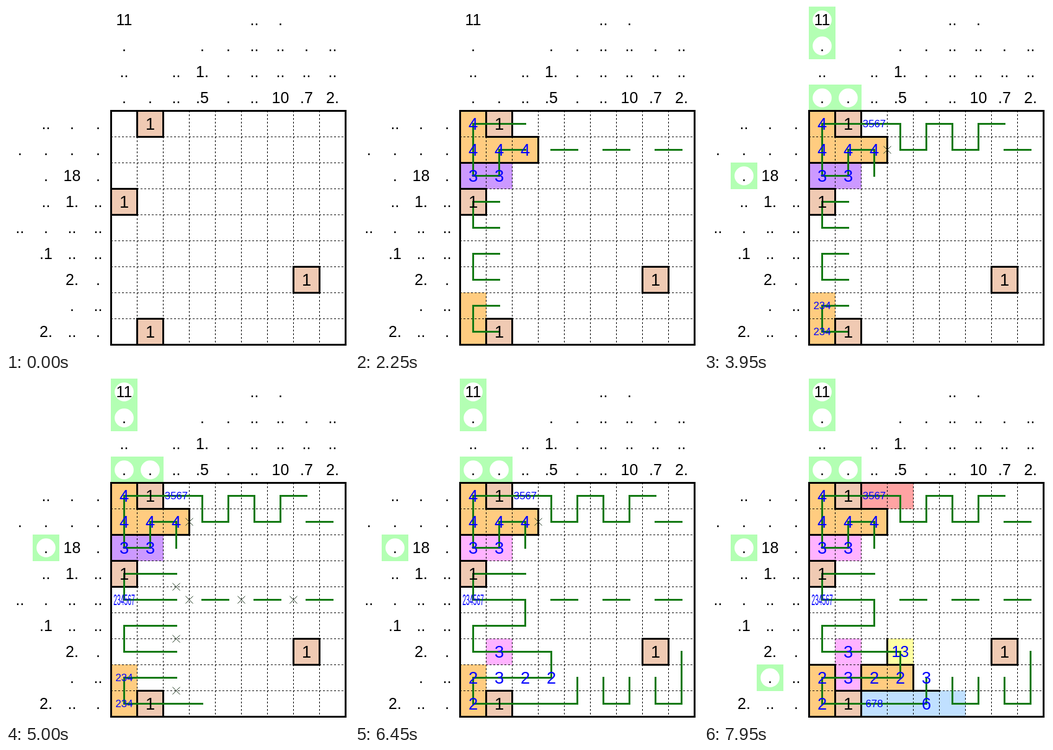
These frames come from a looping animation (553 by 556 pixels, 8 s). An HTML page with a canvas:

```html
<!DOCTYPE html>
<html lang="en">
<head>
<meta charset="utf-8">
<title>Loop puzzle being solved</title>
<style>
  html, body { margin: 0; width: 100%; height: 100%; overflow: hidden; background: #fff; }
  canvas { display: block; }
</style>
</head>
<body>
<canvas id="stage" width="553" height="556"></canvas>
<script>
const ctx = document.getElementById('stage').getContext('2d');
const CELL = 42, ORIGIN = 169.5, SIZE = 9, STEP = 50, LOOP = 8000;
const ORANGE = '#ffcc80', PURPLE = '#cc99ff', PINK = '#ffb3ff', GREEN = '#b3ffb3';
const RED = '#ffa3a3', YELLOW = '#ffffa3', BLUE = '#c0e0ff', GIVEN = '#f0cab3';

const topClues = [
  '11 _ _ _ _ .. . _ _',
  '. _ _ . . .. .. . ..',
  '.. _ .. 1. . .. .. .. ..',
  '. . .. .5 . .. 10 .7 2.'
].map(row => row.split(' '));
const leftClues = [
  '_ .. . .', '. . . .', '_ . 18 .', '_ .. 1. ..', '.. . .. ..',
  '_ .1 .. ..', '_ _ 2. .', '_ _ . ..', '_ 2. .. .'
].map(row => row.split(' '));
const givens = [[0, 1], [3, 0], [6, 7], [8, 1]];

const edge = i => ORIGIN + CELL * i;
const mid = i => edge(i + 0.5);

// Moves: each one puts a mark on a layer, or clears it when value is null.
const move = (layer, value, ...pos) => ({ layer, value, pos });
const fill = (r, c, color) => move('fill', color, r, c);
const ring = (r, c) => move('ring', true, r, c);
const text = (r, c, value) => move('text', value, r, c);
const right = (r, c) => move('line', true, r, c, r, c + 1);
const down = (r, c) => move('line', true, r, c, r + 1, c);
const wallAbove = (r, c) => move('border', true, r, c, r, c + 1);
const wallLeft = (r, c) => move('border', true, r, c, r + 1, c);
const cross = (r, c) => move('cross', true, r, c);
const uncross = (r, c) => move('cross', null, r, c);
const done = (r, c) => [fill(r, c, GREEN), ring(r, c)];

const schedule = [];
const from = (step, ...moves) =>
  moves.flat().forEach((m, i) => schedule.push({ ...m, step: step + i }));

from(1, right(0, 0), down(0, 0), right(8, 0), down(7, 0),
  fill(0, 0, ORANGE), fill(1, 0, ORANGE), fill(8, 0, ORANGE), fill(7, 0, ORANGE),
  wallAbove(2, 0), fill(2, 0, PURPLE), fill(2, 1, PURPLE),
  right(7, 0), right(6, 0), down(5, 0), right(5, 0), right(4, 0), down(3, 0),
  right(3, 0), right(2, 0), down(1, 0));
from(21, text(0, 0, '4'), text(1, 0, '4'), text(2, 0, '3'), text(2, 1, '3'),
  down(1, 1), right(1, 1), fill(1, 1, ORANGE), text(1, 1, '4'),
  fill(1, 2, ORANGE), text(1, 2, '4'),
  wallAbove(1, 2), wallLeft(1, 3), wallAbove(2, 1), wallAbove(2, 2), right(0, 1));
from(38, right(1, 3), right(1, 5), right(1, 7));
from(46, cross(1, 2.5), down(1, 2), done(2, -3));
from(52, right(0, 2), down(0, 3));
from(56, down(0, 4), right(0, 4), down(0, 5));
from(61, down(0, 6), right(0, 6));
from(65, text(0, 2, '34567'));
from(69, done(-4, 0), done(-3, 0), done(-1, 0), done(-1, 1),
  text(0, 2, '3567'), text(7, 0, '234'), text(8, 0, '234'), text(4, 0, '234567'));
from(85, right(8, 1), right(8, 2), right(7, 1), right(6, 1), right(5, 1), right(4, 1), right(3, 1),
  cross(3.5, 2), cross(5.5, 2), cross(7.5, 2), right(4, 3), right(4, 5), right(4, 7),
  cross(4, 2.5), cross(4, 4.5), cross(4, 6.5));
from(102, right(8, 3), down(7, 4), down(7, 5), right(8, 5), down(7, 6),
  down(7, 7), right(8, 7), down(7, 8), right(7, 2), right(6, 2), down(6, 3), down(4, 2),
  uncross(3.5, 2), uncross(5.5, 2), uncross(7.5, 2),
  uncross(4, 2.5), uncross(4, 4.5), uncross(4, 6.5), down(6, 8));
from(121, text(7, 0, '2'), text(8, 0, '2'), text(7, 2, '2'), text(7, 3, '2'),
  fill(2, 0, PINK), fill(2, 1, PINK), fill(6, 1, PINK), text(6, 1, '3'), text(7, 1, '3'));
from(130, fill(7, 1, PINK), wallAbove(7, 0), wallLeft(7, 1),
  fill(7, 2, ORANGE), fill(7, 3, ORANGE), wallLeft(7, 2), wallAbove(7, 2),
  wallAbove(7, 3), wallLeft(7, 4), wallAbove(8, 2), wallAbove(8, 3),
  fill(6, 3, YELLOW), text(6, 3, '13'), wallLeft(6, 3), done(7, -2), uncross(1, 2.5),
  fill(0, 2, RED), fill(0, 3, RED));
from(150, fill(8, 2, BLUE), text(8, 2, '678'));
from(154, fill(8, 3, BLUE), fill(8, 4, BLUE), fill(8, 5, BLUE), wallAbove(8, 4),
  text(8, 4, '6'), text(7, 4, '3'));

function stateAt(step) {
  const marks = { fill: new Map(), ring: new Map(), text: new Map(),
                  line: new Map(), border: new Map(), cross: new Map() };
  for (const m of schedule) {
    if (m.step > step) continue;
    if (m.value === null) marks[m.layer].delete(m.pos.join());
    else marks[m.layer].set(m.pos.join(), m);
  }
  return marks;
}

function segment(x1, y1, x2, y2) {
  ctx.beginPath();
  ctx.moveTo(x1, y1);
  ctx.lineTo(x2, y2);
  ctx.stroke();
}

function pen(color, width, cap = 'square', dash = []) {
  ctx.strokeStyle = color;
  ctx.lineWidth = width;
  ctx.lineCap = cap;
  ctx.setLineDash(dash);
}

function paintCell(r, c, color) {
  ctx.fillStyle = color;
  ctx.fillRect(edge(c) - 0.5, edge(r) - 0.5, CELL + 1, CELL + 1);
}

function write(r, c, string, size, color, condense = 1) {
  ctx.save();
  ctx.font = `${size}px "Liberation Sans", Arial, sans-serif`;
  ctx.textAlign = 'center';
  ctx.fillStyle = color;
  ctx.translate(mid(c), mid(r) + size * 0.35);
  ctx.scale(condense, 1);
  ctx.fillText(string, 0, 0);
  ctx.restore();
}

function writeEntry(r, c, string) {
  const n = string.length;
  if (n > 4) write(r, c, string, 24, '#00f', 2.6 / n);
  else write(r, c, string, n > 2 ? 16.8 : n > 1 ? 25 : 27.3, '#00f');
}

function draw(step) {
  const marks = stateAt(step);
  const end = edge(SIZE);
  ctx.fillStyle = '#fff';
  ctx.fillRect(0, 0, 553, 556);

  for (const { pos: [r, c], value } of marks.fill.values()) paintCell(r, c, value);
  for (const [r, c] of givens) paintCell(r, c, GIVEN);
  ctx.fillStyle = '#fff';
  for (const { pos: [r, c] } of marks.ring.values()) {
    ctx.beginPath();
    ctx.arc(mid(c), mid(r), 15.3, 0, 2 * Math.PI);
    ctx.fill();
  }

  pen('#000', 1, 'butt', [3, 3]);
  for (let i = 1; i < SIZE; i++) {
    segment(edge(i), ORIGIN - 0.5, edge(i), end);
    segment(ORIGIN - 0.5, edge(i), end, edge(i));
  }

  pen('#000', 3);
  for (const [r, c] of givens) ctx.strokeRect(edge(c), edge(r), CELL, CELL);
  for (const { pos: [r1, c1, r2, c2] } of marks.border.values())
    segment(edge(c1), edge(r1), edge(c2), edge(r2));
  ctx.strokeRect(ORIGIN, ORIGIN, end - ORIGIN, end - ORIGIN);

  pen('#147a14', 3);
  for (const { pos: [r1, c1, r2, c2] } of marks.line.values())
    segment(mid(c1), mid(r1), mid(c2), mid(r2));

  pen('#243c24', 1, 'butt');
  for (const { pos: [r, c] } of marks.cross.values()) {
    const x = mid(c), y = mid(r), arm = 6;
    segment(x - arm, y - arm, x + arm, y + arm);
    segment(x - arm, y + arm, x + arm, y - arm);
  }

  const clue = (r, c, s) => s !== '_' && write(r, c, s, 25, '#000');
  topClues.forEach((row, i) => row.forEach((s, c) => clue(i - 4, c, s)));
  leftClues.forEach((row, r) => row.forEach((s, i) => clue(r, i - 4, s)));
  for (const [r, c] of givens) write(r, c, '1', 27.3, '#000');
  for (const { pos: [r, c], value } of marks.text.values()) writeEntry(r, c, value);
}

const start = performance.now();
let shown = -1;
function tick() {
  const step = Math.floor((performance.now() - start) % LOOP / STEP);
  if (step !== shown) draw(shown = step);
  requestAnimationFrame(tick);
}
tick();
</script>
</body>
</html>
```
